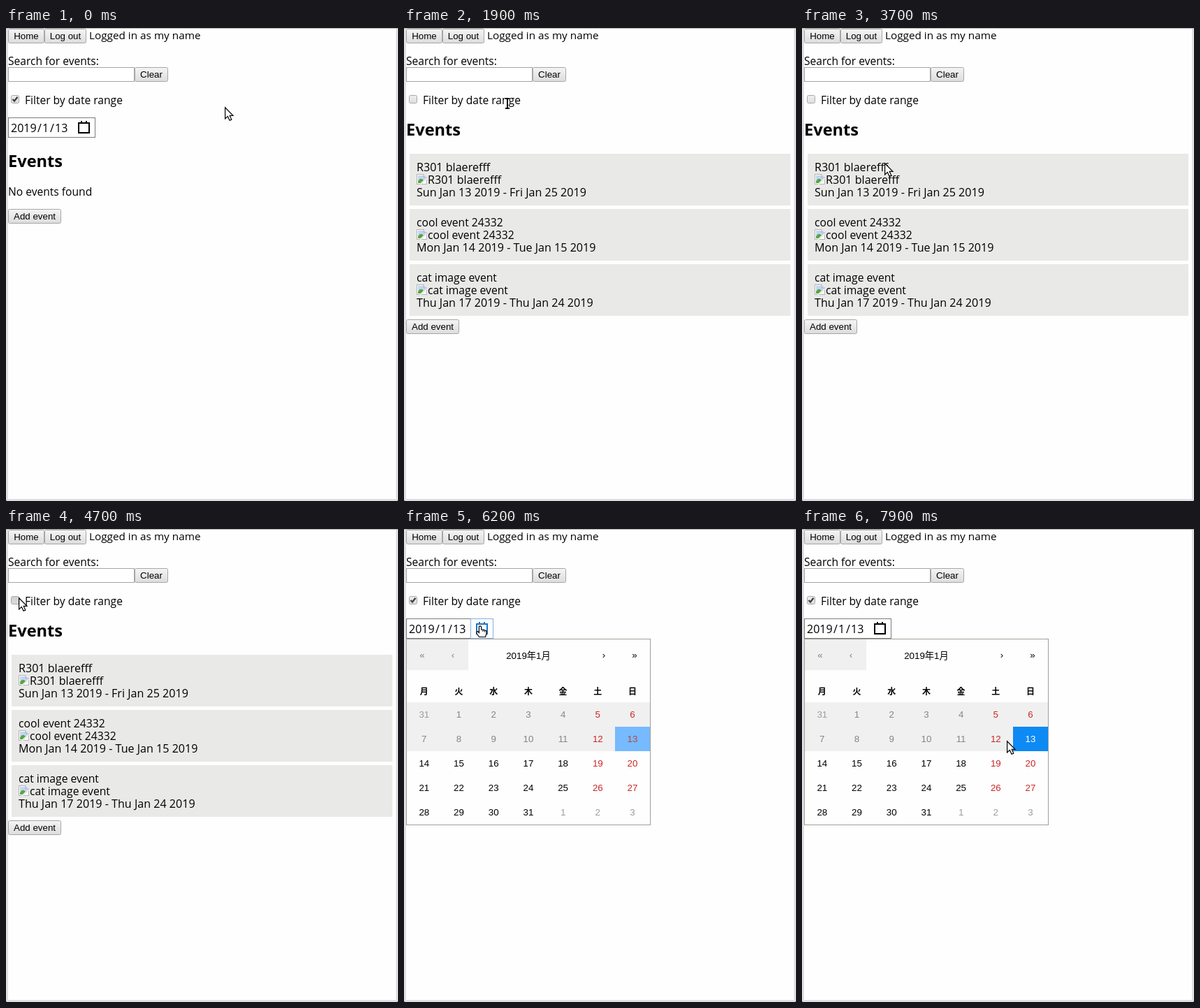
Animation, 561 px wide and 677 px high, one loop 8000 ms. Source, as an HTML page with a canvas:

```html
<!DOCTYPE html>
<html lang="en">
<head>
<meta charset="utf-8">
<title>Event list with date filter</title>
<style>
  html, body { margin: 0; width: 100%; height: 100%; overflow: hidden; background: #fefefe; }
  canvas { display: block; }
</style>
</head>
<body>
<canvas id="stage" width="561" height="677"></canvas>
<script>
const ctx = document.getElementById('stage').getContext('2d');
const LOOP = 8000, STEP = 100;
const BODY = '"Open Sans", "Noto Sans", sans-serif';
const UI = '"Liberation Sans", "Noto Sans CJK JP", "Noto Sans CJK", sans-serif';
const CJK = '"Noto Sans CJK JP", "Noto Sans CJK", sans-serif';

// time, hotspot x, hotspot y, pointer shape
const PATH = [
  [0, 313, 113, 'arrow'], [600, 313, 113, 'arrow'], [700, 240, 118, 'arrow'],
  [800, 171, 125, 'arrow'], [1100, 171, 125, 'arrow'], [1200, 158, 114, 'beam'],
  [1300, 157, 111, 'beam'], [1400, 157, 111, 'beam'], [1500, 148, 108, 'beam'],
  [2200, 148, 108, 'beam'], [2400, 192, 190, 'arrow'], [2600, 210, 300, 'arrow'],
  [2800, 150, 415, 'arrow'], [3000, 128, 416, 'arrow'], [3100, 139, 405, 'beam'],
  [3200, 165, 370, 'arrow'], [3500, 185, 260, 'arrow'], [3800, 85, 160, 'arrow'],
  [4000, 23, 97, 'arrow'], [4200, 21, 95, 'arrow'], [4400, 18, 98, 'arrow'],
  [5200, 18, 98, 'arrow'], [5300, 14, 102, 'arrow'], [5500, 25, 130, 'arrow'],
  [5600, 48, 143, 'beam'], [5700, 78, 146, 'beam'], [5800, 104, 140, 'hand'],
  [5900, 109, 138, 'hand'], [6300, 109, 138, 'hand'], [6400, 118, 160, 'arrow'],
  [6600, 205, 245, 'arrow'], [6800, 308, 292, 'hand'], [6900, 328, 296, 'hand'],
  [7000, 328, 296, 'hand'], [7200, 331, 298, 'hand'], [7700, 331, 298, 'hand'],
  [7800, 312, 301, 'hand'], [7900, 293, 303, 'arrow']
];

const EVENTS = [
  ['R301 blaerefff', 'Sun Jan 13 2019 - Fri Jan 25 2019', 16.1],
  ['cool event 24332', 'Mon Jan 14 2019 - Tue Jan 15 2019', 15.7],
  ['cat image event', 'Thu Jan 17 2019 - Thu Jan 24 2019', 15.7]
];

function rect(x, y, w, h, color) {
  ctx.fillStyle = color;
  ctx.fillRect(x, y, w, h);
}

function frame(x, y, w, h, color, line = 1) {
  ctx.strokeStyle = color;
  ctx.lineWidth = line;
  ctx.strokeRect(x + line / 2, y + line / 2, w - line, h - line);
}

function label(str, x, y, { size = 15.6, family = BODY, weight = 400, color = '#000', align = 'left' } = {}) {
  ctx.font = `${weight} ${size}px ${family}`;
  ctx.fillStyle = color;
  ctx.textAlign = align;
  ctx.fillText(str, x, y);
}

const small = (str, x, y, color = '#000') =>
  label(str, x, y, { size: 13.33, family: UI, color, align: 'center' });

function roundBox(x, y, w, h, top, bottom, border) {
  const fill = ctx.createLinearGradient(0, y, 0, y + h);
  fill.addColorStop(0, top);
  fill.addColorStop(1, bottom);
  ctx.beginPath();
  ctx.roundRect(x + .5, y + .5, w - 1, h - 1, 2);
  ctx.fillStyle = fill;
  ctx.fill();
  ctx.strokeStyle = border;
  ctx.lineWidth = 1;
  ctx.stroke();
}

function button(str, x, y, w) {
  roundBox(x, y, w, 21, '#f5f5f5', '#dcdcdc', '#a6a6a6');
  small(str, x + w / 2, y + 15);
}

function polyline(points, color, width) {
  ctx.beginPath();
  points.forEach(([x, y]) => ctx.lineTo(x, y));
  ctx.strokeStyle = color;
  ctx.lineWidth = width;
  ctx.stroke();
}

function checkbox(checked, pressed) {
  const [top, bottom] = pressed ? ['#cfd0cf', '#dcdcdc'] : ['#efefef', '#dedede'];
  roundBox(7, 96, 12, 12, top, bottom, '#a8a8a8');
  if (checked) polyline([[9.5, 102], [12, 104.5], [16.5, 98.8]], '#404040', 2.4);
}

function brokenImage(x, y) {
  rect(x, y, 15, 15, '#fff');
  frame(x, y, 15, 15, '#b4b4b4');
  rect(x + 2, y + 2, 11, 7, '#c3d5f4');
  ctx.fillStyle = '#55a83f';
  ctx.beginPath();
  ctx.moveTo(x + 2, y + 13);
  ctx.lineTo(x + 2, y + 10);
  ctx.quadraticCurveTo(x + 6, y + 4, x + 10, y + 9);
  ctx.lineTo(x + 6, y + 13);
  ctx.fill();
  polyline([[x + 5, y + 15], [x + 15, y + 6]], '#e9e9e8', 2);
  ctx.fillStyle = '#e9e9e8';
  ctx.beginPath();
  ctx.moveTo(x + 10, y);
  ctx.lineTo(x + 15, y);
  ctx.lineTo(x + 15, y + 5);
  ctx.fill();
  polyline([[x + 10, y], [x + 10, y + 5], [x + 15, y + 5]], '#b4b4b4', 1);
}

function heading(y) {
  label('Events', 3, y, { size: 23.6, weight: 700 });
}

function eventList() {
  heading(154);
  EVENTS.forEach(([name, dates, size], i) => {
    const y = 180 + 79 * i;
    rect(8, y, 545, 74, '#e9e9e8');
    label(name, 18, y + 25, { size });
    brokenImage(18, y + 29);
    label(name, 34, y + 43, { size });
    label(dates, 18, y + 61, { size: 16.1 });
  });
  button('Add event', 3, 417, 76);
}

function dateField(active) {
  rect(3, 128, 125, 29, '#fff');
  frame(3, 128, 125, 29, '#7c7c7c');
  [['2019', 7], ['/', 45], ['1', 52], ['/', 63], ['13', 70]]
    .forEach(([part, x]) => label(part, x, 149, { size: 16 }));
  if (active) frame(95, 128, 33, 29, '#86aee0');
  const ink = active ? '#1878cc' : '#000';
  frame(103, 135, 17, 16, ink, 2);
  rect(107, 133, 2, 4, ink);
  rect(114, 133, 2, 4, ink);
}

function calendar(t) {
  rect(3, 157, 350, 267, '#fefefe');
  rect(4, 158, 88, 44, '#f0f0f0');
  small('«', 26, 185, '#808080');
  small('‹', 70, 185, '#808080');
  small('2019年1月', 178, 186);
  small('›', 286, 185);
  small('»', 330, 185);

  const column = i => 28.8 + 49.7 * i;
  [...'月火水木金土日'].forEach((day, i) =>
    label(day, column(i), 237, { size: 12, family: CJK, weight: 700, align: 'center' }));

  rect(4, 248, 348, 70, '#f0f0f0');
  const picked = t >= 7200, hovered = t >= 6800;
  rect(302, 283, 50, 35, picked ? '#0d8af4' : hovered ? '#a9d4ff' : '#76baff');

  for (let i = 0; i < 35; i++) {
    const col = i % 7, row = Math.floor(i / 7);
    const day = (i + 30) % 31 + 1;
    const outside = i === 0 || i > 31;
    let color = '#000';
    if (outside) color = '#9c9c9c';
    else if (col > 4) color = '#ca2626';
    else if (row < 2) color = '#858585';
    if (day === 13) color = picked ? '#fff' : '#b04848';
    small(day, column(col), 270 + 35 * row, color);
  }
  frame(3, 157, 350, 267, '#a0a096');
}

function page(t) {
  rect(0, 0, 561, 677, '#fefefe');
  rect(0, 0, 3, 677, '#dde0e2');
  rect(558, 0, 3, 677, '#dde0e2');
  rect(0, 674, 561, 3, '#dde0e2');
  rect(0, 0, 561, 1, '#b2b2b2');
  rect(0, 676, 1, 1, '#555');
  rect(560, 676, 1, 1, '#555');

  button('Home', 3, 1, 52);
  button('Log out', 55, 1, 60);
  label('Logged in as my name', 119, 16, { size: 15.3 });
  label('Search for events:', 3, 53);
  rect(3, 56, 181, 21, '#fff');
  frame(3, 56, 181, 21, '#a4a4a4');
  button('Clear', 184, 56, 48);

  const filtered = t < 1900 || t >= 4800;
  checkbox(filtered, t >= 4700 && t < 4800);
  label('Filter by date range', 27, 109);
  if (!filtered) return eventList();

  dateField(t >= 5800 && t < 7100);
  heading(199);
  label('No events found', 3, 240);
  button('Add event', 3, 259, 76);
  if (t >= 6200) calendar(t);
}

function outline(path) {
  const shape = new Path2D(path);
  ctx.fillStyle = '#fff';
  ctx.fill(shape);
  ctx.strokeStyle = '#000';
  ctx.lineWidth = 1.2;
  ctx.stroke(shape);
}

const POINTERS = {
  arrow() {
    outline('M.6 .8V16.8L4.4 13.4L7 19.3L9.8 18.1L7.2 12.3H12Z');
  },
  beam() {
    const stem = [[0, -7], [0, 7]];
    const caps = [-7, 7].map(y => [[-3, y], [3, y]]);
    for (const [color, width] of [['#fff', 4], ['#000', 2]]) {
      polyline(stem, color, width);
      caps.forEach(cap => polyline(cap, color, width));
    }
  },
  hand() {
    outline('M-1.6 9V1.8Q0 -.2 1.6 1.8V6L4 6.2L6.5 6.8L9 8V12L7.5 16.5H-1.5L-5 11.5Q-5.5 8.5 -3.4 8.6L-1.6 10.5Z');
    polyline([[4, 7], [4, 9]], '#000', 1);
    polyline([[6.5, 7.5], [6.5, 9.5]], '#000', 1);
  }
};

function pointer(t) {
  let i = PATH.length - 1;
  while (PATH[i][0] > t) i--;
  const [t0, x0, y0, shape] = PATH[i];
  const [t1, x1, y1] = PATH[i + 1] || [LOOP, x0, y0];
  const k = (t - t0) / (t1 - t0);
  ctx.save();
  ctx.translate(Math.round(x0 + (x1 - x0) * k), Math.round(y0 + (y1 - y0) * k));
  POINTERS[shape]();
  ctx.restore();
}

const start = performance.now();
function draw() {
  const elapsed = (performance.now() - start) % LOOP;
  const t = Math.floor(elapsed / STEP) * STEP;
  page(t);
  pointer(t);
  requestAnimationFrame(draw);
}
draw();
</script>
</body>
</html>
```
